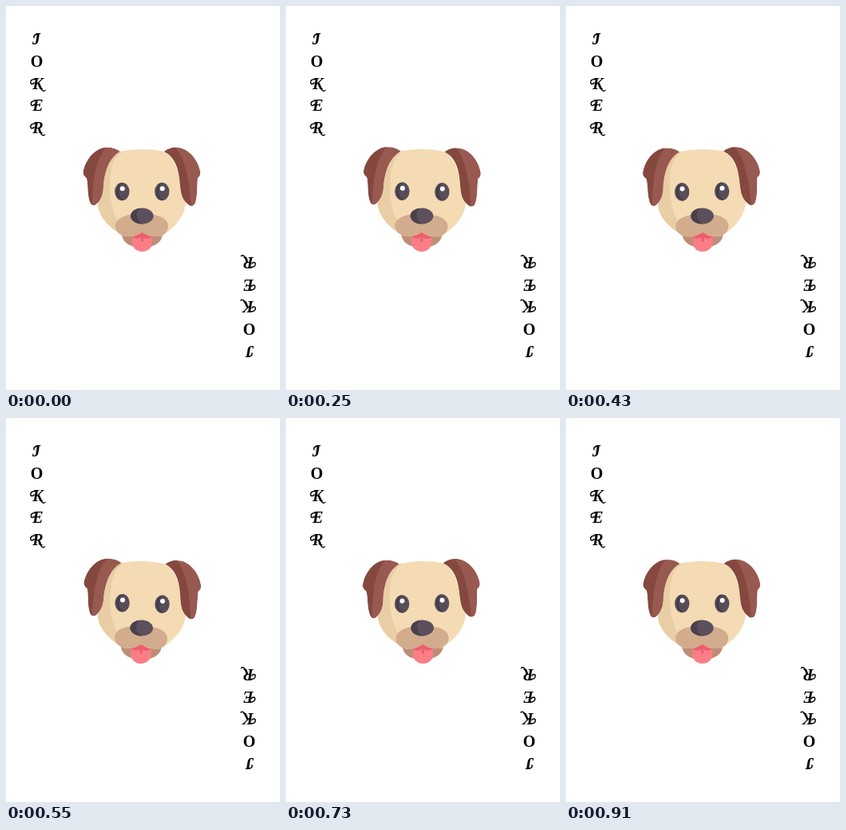
These frames come from a looping animation (343x480 px, 0.97 s). An HTML page:

```html
<!DOCTYPE html>
<html lang="en">
<head>
<meta charset="utf-8">
<title>Joker card</title>
<style>
  html, body { margin: 0; width: 100%; height: 100%; overflow: hidden; background: #fff; }
  svg { display: block; width: 100vw; height: 100vh; }
  text { font: italic bold 20px "Liberation Serif", "Noto Serif", serif; text-anchor: middle; fill: #000; }
  .upright { font-style: normal; }
  .swash { fill: none; stroke: #000; stroke-width: 1.5; stroke-linecap: round; }
</style>
</head>
<body>
<svg viewBox="0 0 343 480" xmlns="http://www.w3.org/2000/svg">
  <defs>
    <clipPath id="leftEar"><path id="earL" d="M143 182C137 177 126 175 117 179C106 184 99 196 97 206C96 210 98 213 101 215C103 222 102 232 104 241C106 250 110 251 114 247C120 241 122 233 122 224C124 206 129 190 143 182Z"/></clipPath>
    <clipPath id="rightEar"><path id="earR" d="M198 182C204 177 214 175 223 179C234 184 241 196 243 206C244 210 243 213 240 215C239 226 240 238 237 246C235 251 231 251 227 247C220 241 219 233 218 224C217 207 213 189 198 182Z"/></clipPath>
    <clipPath id="noseClip"><ellipse cx="170.3" cy="262.5" rx="14.3" ry="10"/></clipPath>
    <g id="eye">
      <ellipse rx="9.2" ry="11.3" fill="#574c5a"/>
      <path d="M0-11.3A9.2 11.3 0 0 0 2 11C-5 7-7-4 0-11.3Z" fill="#443a48"/>
      <circle cx=".4" cy="-3.8" r="3" fill="#fff"/>
    </g>
    <g id="label">
      <text x="38" y="48">J</text>
      <text x="38.5" y="76" class="upright">O</text>
      <text x="40" y="104" font-size="19">K</text>
      <text x="40" y="131">E</text>
      <text x="40" y="159">R</text>
      <g class="swash">
        <path d="M40 35.5C36 35 34.5 37 35 39.5"/>
        <path id="curl" d="M37 91.5C32 91 30 94 31 96.5C32 98 34 97.5 35 96"/>
        <use href="#curl" x=".5" y="27"/>
        <use href="#curl" y="55.5"/>
        <path id="tail" d="M43 102C45 106 47 107 49 105.5"/>
        <use href="#tail" x="-.5" y="55.5"/>
      </g>
    </g>
  </defs>
  <rect width="343" height="480" fill="#fff"/>
  <use href="#label"/>
  <use href="#label" transform="rotate(180 171.5 236.7)"/>
  <g id="dog">
    <path d="M145 284C145 296 156 302 170 302C185 302 196 296 196 284Z" fill="#bd8e76"/>
    <path d="M143 182C160 178 181 178 198 182C211 189 216 207 219 222C223 231 225 239 225 246C224 262 211 279 193 288H149C130 279 115 263 115 246C115 239 119 231 122 222C123 207 128 190 143 182Z" fill="#f4dbb3"/>
    <path d="M143 182C128 190 123 207 122 222C119 231 115 239 115 246C115 261 127 275 143 284L147 280C136 267 130 248 130 226C130 207 132 191 147 181Z" fill="#e9cda4"/>
    <g clip-path="url(#leftEar)">
      <use href="#earL" fill="#985951"/>
      <path d="M94 170H132C116 183 108 205 108 255H94Z" fill="#85483f"/>
    </g>
    <g clip-path="url(#rightEar)">
      <use href="#earR" fill="#985951"/>
      <path d="M194 172H208C222 186 229 208 232 255H194Z" fill="#85483f"/>
    </g>
    <use href="#eye" x="145.3" y="232"/>
    <use href="#eye" x="195.3" y="232"/>
    <path d="M170 262C153 258 137 265 137 275C137 284 146 289 155 288C162 288 167 285 170 283C174 285 179 288 186 288C195 289 203 284 203 275C203 265 187 258 170 262Z" fill="#d3ab8d"/>
    <path d="M158 288C162 288 167 285 170.3 283C174 285 178 288 183 288V295C183 302 178 307 170.5 307C163 307 158 302 158 295Z" fill="#fb7e86"/>
    <path d="M158 288C162 288 167 285 170.3 283C174 285 178 288 183 288C181 291 175 292 172 289V294Q170.5 296 169 294V289C166 292 160 291 158 288Z" fill="#ea5f6c"/>
    <g clip-path="url(#noseClip)">
      <rect x="155" y="252" width="31" height="21" fill="#5b505b"/>
      <path d="M155 250H169C161 258 162 268 173 274H155Z" fill="#4a3f4b"/>
    </g>
  </g>
</svg>
<script>
  const LOOP = 970;
  // [start in ms, tilt in degrees]
  const poses = [
    [0, 0], [60, 0.3], [130, 0.6], [250, 0.8], [310, 0.4], [370, -0.3],
    [430, -0.8], [490, 0.4], [550, 1.6], [610, 0.5], [670, -0.7],
    [730, -1.1], [790, -1.4], [850, -0.8], [910, -0.2]
  ];
  const dog = document.getElementById('dog');
  const start = performance.now();

  function tiltAt(t) {
    let tilt = 0;
    for (const [from, angle] of poses) if (t >= from) tilt = angle;
    return tilt;
  }

  function draw(now) {
    const t = Math.max(0, now - start) % LOOP;
    dog.setAttribute('transform', `rotate(${tiltAt(t)} 170 240)`);
    requestAnimationFrame(draw);
  }
  draw(start);
</script>
</body>
</html>
```
